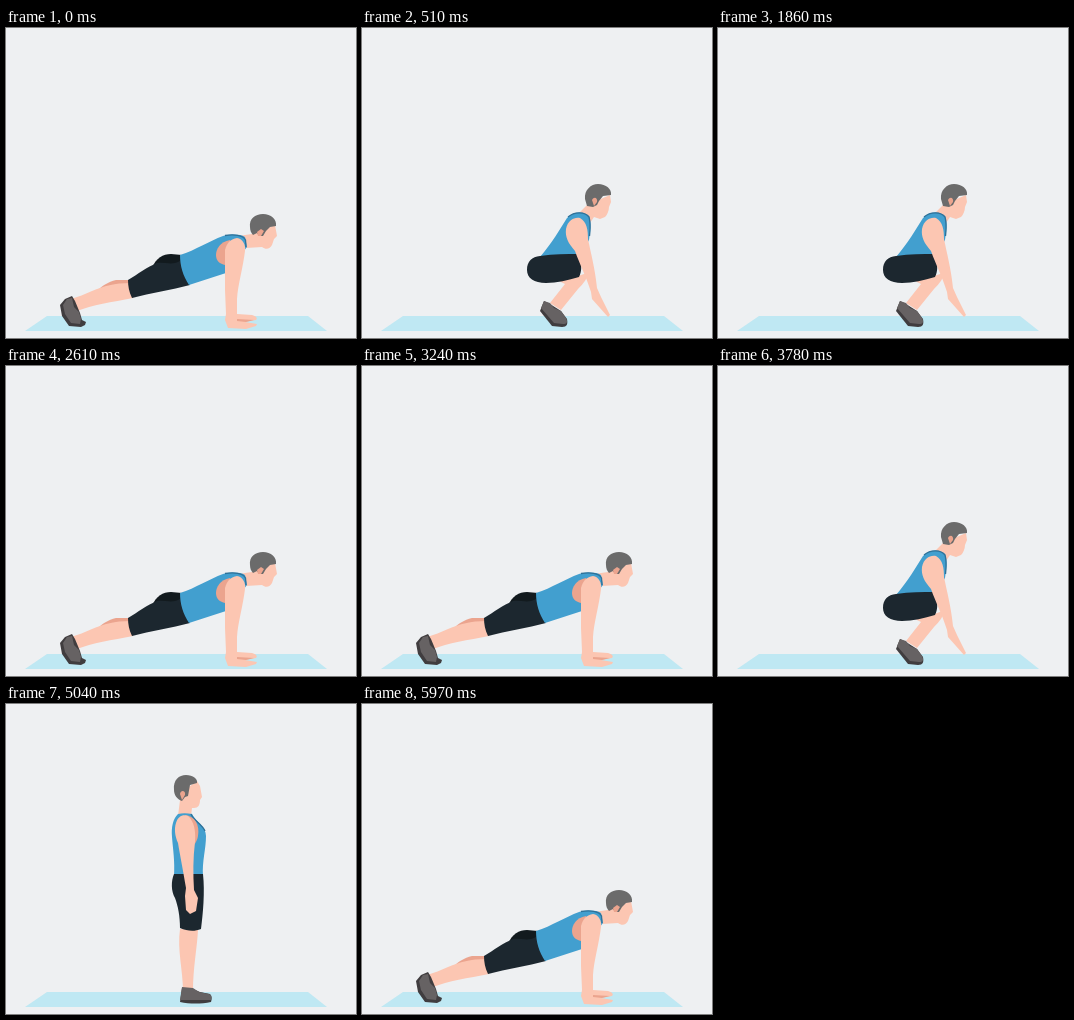
These frames come from a looping animation (350x310 px, 6 s). An HTML page without scripts:

```html
<!DOCTYPE html>
<html lang="en">
<head>
<meta charset="utf-8">
<title>Burpee</title>
<style>
html, body { margin: 0; width: 100%; height: 100%; overflow: hidden; background: #eef0f2; }
svg { display: block; width: 100vw; height: 100vh; }
.mat { fill: #bfe8f3; }
.skin { fill: #fcc6b2; }
.shade { fill: #eba48e; }
.hair { fill: #6b6b6b; }
.top { fill: #429fcf; }
.strap { fill: none; stroke: #2f7198; stroke-width: 1.3; }
.shorts { fill: #1c272f; }
.far { fill: #121a1e; }
.shoe { fill: #666263; }
.sole { fill: #403d3f; }

/* Poses swap with hard cuts */
.pose { opacity: 0; animation: 6s step-end infinite; }
.plank { animation-name: plank; }
.squat { animation-name: squat; }
.jump { animation-name: jump; }
.stand { animation-name: stand; }
@keyframes plank {
  0%, 36.8%, 92.8% { opacity: 1; }
  3.5%, 59.5% { opacity: 0; }
  100% { opacity: 1; }
}
@keyframes squat {
  0%, 11.8%, 36.8%, 67.8%, 92.8%, 100% { opacity: 0; }
  3.5%, 28.4%, 59.5%, 84.4% { opacity: 1; }
}
@keyframes jump {
  0%, 20.1%, 76.1%, 100% { opacity: 0; }
  11.8%, 67.8% { opacity: 1; }
}
@keyframes stand {
  0%, 28.4%, 84.4%, 100% { opacity: 0; }
  20.1%, 76.1% { opacity: 1; }
}
</style>
</head>
<body>
<svg viewBox="0 0 350 310" preserveAspectRatio="none">
  <path class="mat" d="M41 288H302L321 303H19Z"/>

  <g class="pose plank">
    <path class="shade" d="M124 252L110 252C102 254 96 258 92 262L124 262Z"/>
    <path class="skin" d="M125 255C108 255 98 258 86 263C79 266 72 269 65 271L71 283C86 277 106 274 127 270Z"/>
    <path class="sole" d="M59 271L66 268L69 273L74 285L76 292L80 294L79 297L75 299L63 298L56 288L54 277Z"/>
    <path class="shoe" d="M61 271L66 270L68 279L73 284L75 291L74 296L65 295L59 286L57 277Z"/>
    <path class="far" d="M146 240C150 230 157 226 165 226L176 227L180 245L146 247Z"/>
    <path class="shorts" d="M122 252C132 246 141 239 151 235C160 234 168 238 175 232L184 257C165 262 145 265 126 270C123 264 122 258 122 252Z"/>
    <path class="skin" d="M269 197L271 208L268 211L266 217C264 221 260 222 256 219L240 220L232 208L246 206Z"/>
    <path class="hair" d="M244 199C243 191 249 186 257 186C265 186 271 191 270 198L264 199L260 203L257 208L253 208L251 205L247 207C245 205 244 202 244 199Z"/>
    <path class="shade" d="M251 204L255 201L258 203L255 208L252 208Z"/>
    <path class="top" d="M174 227C190 222 203 213 217 208C225 206 234 206 239 209L241 219L220 245L183 257C177 248 174 238 174 227Z"/>
    <path class="strap" d="M219 207.500C228 206 237 207 239.500 212L240 219"/>
    <path class="shade" d="M224 212C214 214 210 221 210 227C210 233 214 236 219 237L232 229Z"/>
    <path class="skin" d="M219 222C221 214 225 211 231 210C237 211 240 217 239 223C237 240 232 256 231 271L231 286L246 287C250 288 252 290 250 292L239 294L251 296L250 298L240 301L222 300L219 292L220 286L219 262Z"/>
    <path class="shade" d="M231 291L248 292L240 294L231 293Z"/>
  </g>

  <g class="pose squat">
    <path class="skin" d="M197 253L216 248L225 245C226 250 222 255 216 261L199 282L188 275L203 256Z"/>
    <path class="sole" d="M182 273L188 276L199 283L205 291C206 296 205 299 200 299L190 298L178 283Z"/>
    <path class="shoe" d="M182 273L188 275L192 280L199 283L204 290C206 294 205 296 201 296L192 295L179 280Z"/>
    <path class="skin" d="M248 167L249 174L247 179C247 183 245 187 243 189L238 191L232 189L228 195L212 193L216 186L225 177Z"/>
    <path class="hair" d="M223 171C222 162 229 156 236 156C244 156 250 161 249 167L241 168L237 173L235 177L231 179L225 178Z"/>
    <path class="shade" d="M230 172C232 168 236 170 235 174L232 178Z"/>
    <path class="top" d="M178 229C190 215 198 201 205 190C212 183 222 183 227 188C230 197 228 205 227 212L218 229Z"/>
    <path class="strap" d="M206 189C213 183 223 184 227 189C229 196 228 202 227.500 208"/>
    <path class="shorts" d="M178 228C192 226 204 226 217 226C220 235 220 243 217 249C206 252 195 255 184 255C172 255 165 250 165 242C165 233 170 229 178 228Z"/>
    <path class="skin" d="M204 201C206 192 212 189 218 190C225 194 226 202 226 211C229 226 233 240 235 260L239 269L248 287L246 289L238 280L230 271L229 264C224 248 218 237 213 223C206 215 203 209 204 201Z"/>
  </g>

  <g class="pose jump">
    <path class="skin" d="M186 199L204 199C203 220 199 238 199 259L189 255C190 238 183 222 186 199Z"/>
    <path class="sole" d="M186 250L190 255L199 258L206 268L207 274L204 278L193 272L180 263C181 257 183 253 186 250Z"/>
    <path class="shoe" d="M186 250L190 255L199 257L206 267C208 272 206 275 203 275L193 269L181 260Z"/>
    <path class="skin" d="M186 62L206 52L208 65L205 76L200 88L184 88Z"/>
    <path class="hair" d="M179 59C178 49 184 44 191 44C197 44 201 46 203 49L199 58L192 61L191 67L186 70L181 67Z"/>
    <path class="shade" d="M185 62C187 58 191 60 191 64L187 69Z"/>
    <path class="top" d="M184 83C178 90 177 98 179 106C181 120 180 132 180 144L209 145C208 130 211 117 211 104C211 96 207 91 203 87Z"/>
    <path class="strap" d="M184 84C179 90 177.500 96 179 103"/>
    <path class="shade" d="M182 100C182 107 187 112 194 112C201 112 205 106 204 98Z"/>
    <path class="skin" d="M204 25L202 19L207 13L213 9L216 11L215 20L211 27C210 45 206 66 204 84C204 95 202 104 193 105C185 105 181 100 182 93C189 82 193 72 195 60C197 47 200 37 204 25Z"/>
    <path class="shorts" d="M180 142L209 144C210 160 208 182 207 198C200 201 192 200 186 198C185 186 185 174 181 166C176 158 176 149 180 142Z"/>
  </g>

  <g class="pose stand">
    <path class="skin" d="M174 225L192 226C191 245 187 264 187 287L177 287C177 266 171 246 174 225Z"/>
    <path class="sole" d="M176 284L187 285L194 288L204 290C206 292 206 295 205 298C195 300 184 300 174 298Z"/>
    <path class="shoe" d="M176 283L187 284L193 288L203 290C206 291 206 294 205 296L174 296Z"/>
    <path class="skin" d="M191 77L194 82L196 93L194 96C194 101 192 104 188 104L186 104L185 112L172 112L174 96L180 85Z"/>
    <path class="hair" d="M168 86C167 76 173 71 180 71C187 71 192 75 191 79L184 81L182 92L179 93L176 97C171 95 168 91 168 86Z"/>
    <path class="shade" d="M174 90C175 85 180 87 179 91L176 96Z"/>
    <path class="top" d="M172 110C176 109 181 109 186 110C189 117 200 122 200 132C200 145 196 157 197 172L168 172C169 157 167 146 166 133C165 123 167 115 172 110Z"/>
    <path class="strap" d="M185 110C188 117 196 120 199 127"/>
    <path class="shorts" d="M168 170L197 170C199 188 197 210 195 225C188 228 181 227 174 224C174 212 172 202 169 194C165 187 165 177 168 170Z"/>
    <path class="shade" d="M179 111C189 112 194 121 192 132C191 138 188 142 184 143Z"/>
    <path class="skin" d="M170 119C172 112 177 110 182 112C188 117 190 127 189 138C187 154 187 170 188 186L192 194L190 207L184 210L180 206L179 192L180 184C177 166 174 151 172 139C169 132 168 125 170 119Z"/>
  </g>
</svg>
</body>
</html>
```
